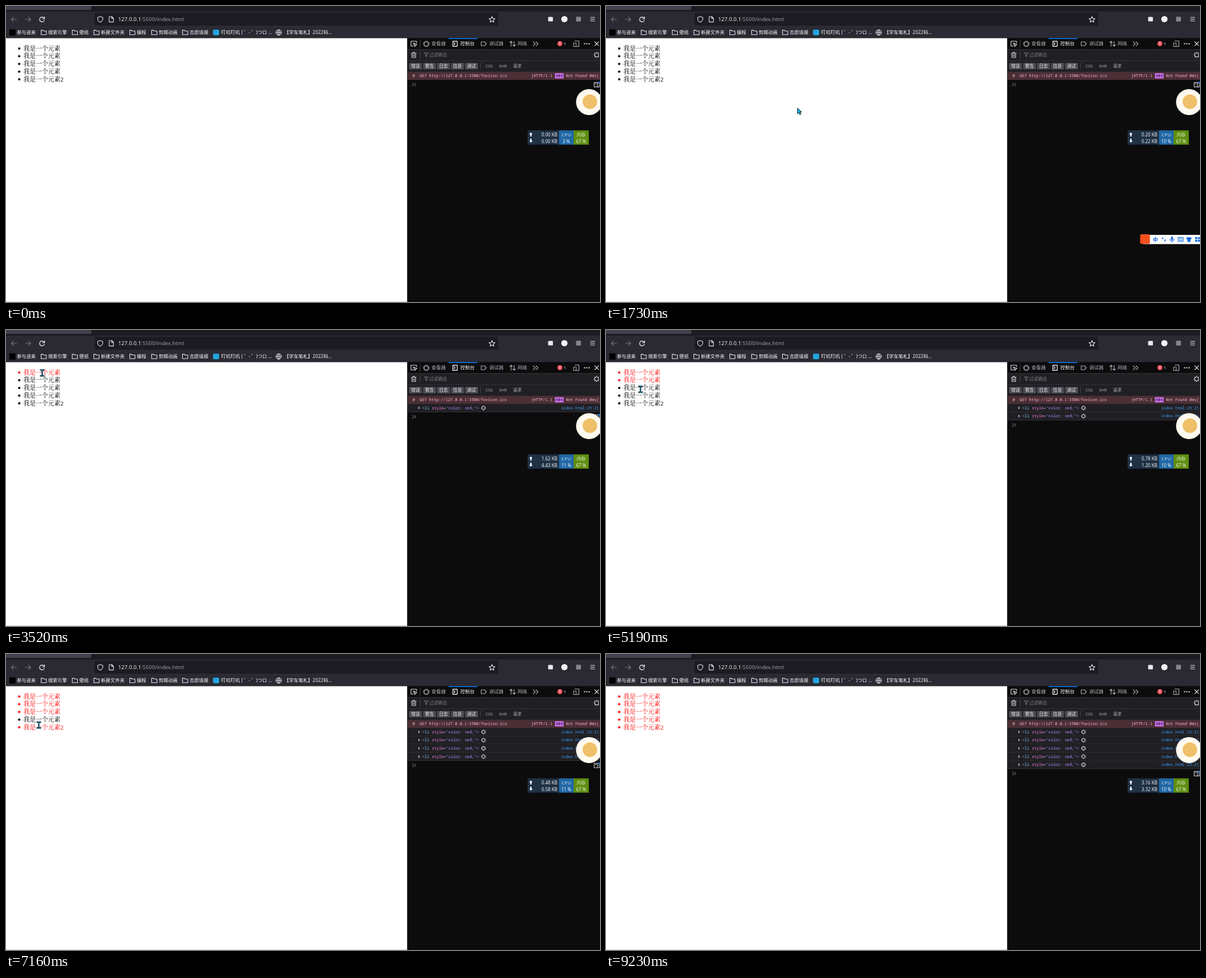
Animation, 1059 px wide and 529 px high, one loop 9.37 s. Source, as an HTML page:

```html
<!DOCTYPE html>
<html lang="zh-CN">
<head>
<meta charset="utf-8">
<title>List click demo</title>
<style>
html, body { margin: 0; width: 100%; height: 100%; overflow: hidden; background: #0c0c0d; }
svg { display: block; width: 1059px; height: 529px; }
text { white-space: pre; }
.ui { font-family: "Open Sans", "Noto Sans CJK SC", "Noto Sans CJK", sans-serif; }
.mono { font-family: "Noto Sans Mono", "Liberation Mono", monospace; font-size: 7px; }
.page { font-family: "Liberation Serif", "Noto Serif CJK SC", "Noto Sans CJK SC", serif; font-size: 11px; font-weight: 300; }
.line { fill: none; stroke: #e8e8ee; stroke-width: 1.1; stroke-linecap: round; stroke-linejoin: round; }
</style>
</head>
<body>
<svg id="stage" viewBox="0 0 1059 529" xmlns="http://www.w3.org/2000/svg"></svg>
<script>
const LOOP = 9370;
const ROW = 14.65;
const ITEM = 13.75;

const rect = (x, y, w, h, fill, extra = "") =>
  `<rect x="${x}" y="${y}" width="${w}" height="${h}" fill="${fill}" ${extra}/>`;
const circle = (x, y, r, fill) => `<circle cx="${x}" cy="${y}" r="${r}" fill="${fill}"/>`;
const line = (d, extra = "") => `<path class="line" d="${d}" ${extra}/>`;
const text = (x, y, s, size, fill, extra = "") =>
  `<text class="ui" x="${x}" y="${y}" font-size="${size}" fill="${fill}" ${extra}>${s}</text>`;
const mono = (x, y, s, fill, extra = "") =>
  `<text class="mono" x="${x}" y="${y}" fill="${fill}" ${extra}>${s}</text>`;
const group = (id, body, extra = "") => `<g id="${id}" ${extra}>${body}</g>`;
const MID = 'text-anchor="middle"';
const END = 'text-anchor="end"';
const LIGHT = "#fbfbfe";

function browserBar() {
  const folders = [[62, "搜索引擎"], [117.5, "壁纸"], [156, "新建文件夹"],
    [220, "编程"], [259, "剪辑动画"], [314, "志愿填报"]];
  const folder = ([x, name]) =>
    line(`M${x + .6} 51V43.4H${x + 4}L${x + 5.2} 44.8H${x + 10}V51.3H${x + .6}Z`) +
    text(x + 13.2, 50.3, name, 8.45, LIGHT);
  return rect(0, 0, 1059, 10, "#1c1b22") +
    rect(-4, -6, 156, 13, "#42414d", 'rx="2"') +
    rect(0, 10, 1059, 47.5, "#2b2a33") +
    rect(158, 12, 719.5, 23, "#1c1b22", 'rx="3"') +
    line("M19 24H9.5M13.5 20L9.5 24L13.5 28", 'stroke="#77767e" style="stroke:#77767e"') +
    line("M34.5 24H44M40 20L44 24L40 28", 'style="stroke:#77767e"') +
    line("M68 22A4.3 4.3 0 1 0 68.3 25.4M68.6 19.4V22.6H65.4", 'style="stroke-width:1.3"') +
    line("M168 18.8L172.5 20.4V23.5Q172 27 168 29Q164 27 163.5 23.5V20.4Z") +
    line("M184 19H188.6L191.6 22V28.6H184ZM188.4 19.2V22.2H191.4") +
    text(200, 27, `<tspan fill="${LIGHT}">127.0.0.1</tspan>:5500/index.html`, 9.7, "#a3a3ab") +
    line("M866.5 18.8L868 22.2L871.8 22.6L869 25.1L869.8 28.8L866.5 26.9L863.2 28.8L864 25.1L861.2 22.6L865 22.2Z") +
    rect(966.5, 19.5, 8.6, 8, "#e8e8ee", 'rx="1.5"') +
    circle(995.5, 23.5, 5.6, "#f4f4f6") +
    rect(1016.5, 19.3, 8.4, 8.4, "#87868e") +
    line("M1042 20.3H1049.5M1042 23.5H1049.5M1042 26.7H1049.5") +
    rect(6, 41.8, 11, 11, "#000") +
    text(19.3, 50.3, "参与进来", 8.45, LIGHT) +
    folders.map(folder).join("") +
    rect(369, 42.2, 11, 10, "#20a4de", 'rx="2"') +
    text(383.5, 50.3, "叮叽叮叽 ( ゜- ゜)つロ ...", 8.45, LIGHT) +
    line("M481.2 47.3H491.2M486.2 42.4V52.2M486.2 42.4A4.9 4.9 0 1 0 486.2 52.2A4.9 4.9 0 1 0 486.2 42.4A2.3 4.9 0 0 0 486.2 52.2A2.3 4.9 0 0 0 486.2 42.4", 'style="stroke-width:.9"') +
    text(496, 50.3, "【学车笔札】2022科...", 8.45, LIGHT);
}

function page() {
  let out = rect(0, 57.5, 715, 471.5, "#fff") + rect(0, 527.7, 715, 1.3, "#d9d9dc");
  for (let i = 0; i < 5; i++) {
    const y = 75.6 + i * ITEM;
    out += group("item" + i, circle(23.6, y + .4, 2.1, "inherit").replace('fill="inherit"', "") +
      `<text class="page" x="31" y="${y + 3.9}">我是一个元素${i === 4 ? "2" : ""}</text>`);
  }
  return out;
}

function devtools() {
  const tab = (x, s, fill = "#b1b1b8") => text(x, 70.4, s, 8.5, fill);
  const grey = 'style="stroke:#b1b1b8"';
  const filters = ["错误", "警告", "日志", "信息", "调试"].map((s, i) =>
    rect(718.5 + i * 25, 101.7, 23, 11.6, "#4c4c55", 'rx="1.2"') +
    text(730 + i * 25, 110.3, s, 7.7, "#f0f0f4", MID)).join("");
  return rect(715, 57.5, 1.2, 471.5, "#38383d") +
    rect(716, 57.5, 343, 471.5, "#0c0c0d") +
    rect(716, 77, 343, 40.5, "#202024") +
    rect(716, 77, 343, .8, "#38383d") + rect(716, 97.4, 343, .8, "#38383d") +
    line("M726 71.5H722V63H732V66M726.5 66.2L732.5 69L730 70L729 72.6Z") +
    line("M738.3 61V74", 'style="stroke:#44444a"') +
    line("M745.8 64.2H752.8V71.2H745.8ZM748 62.5V64M750.6 62.5V64M748 71.3V73M750.6 71.3V73M744 66.4H745.6M744 69H745.6M753 66.4H754.6M753 69H754.6", grey) +
    tab(758.5, "查看器") +
    rect(789, 57.5, 51.5, 1.5, "#0a84ff") +
    line("M796.5 63H804.5V72H796.5ZM798.5 65.5L800.6 67.5L798.5 69.5", 'style="stroke-width:1.3"') +
    tab(810, "控制台", LIGHT) +
    line("M847.2 64H853L856.5 67.5L853 71H847.2Z", grey) + tab(861.5, "调试器") +
    line("M900.5 72V63M898 65.6L900.5 63L903 65.6M906 63V72M903.5 69.4L906 72L908.5 69.4", grey) +
    tab(912, "网络") +
    line("M940 64L943.6 67.5L940 71M945 64L948.6 67.5L945 71", grey) +
    circle(987.5, 67.3, 4.5, "#ff4f5e") + rect(986.9, 64.6, 1.2, 3.4, "#fff") + rect(986.9, 68.8, 1.2, 1.2, "#fff") +
    text(994, 70.4, "1", 8, "#d0d0d6") +
    line("M1014.5 62.5H1021.5V72.5H1014.5M1012 66H1016.4V72.5H1012Z", grey) +
    [1031.5, 1035.6, 1039.7].map(x => circle(x, 67.5, 1.2, "#d0d0d6")).join("") +
    line("M1049.8 64L1056.6 70.8M1056.6 64L1049.8 70.8") +
    line("M722.6 84.5H731.4M725.5 84.3V82.8H728.5V84.3M723.6 84.6V92H730.4V84.6M725.8 86.5V90M728.2 86.5V90", 'style="stroke:#d0d0d6"') +
    line("M738.3 81V94", 'style="stroke:#44444a"') +
    line("M746 84H752.6L750 87.2V91L748.6 90V87.2Z", 'style="stroke:#88888f;stroke-width:.9"') +
    text(754.5, 90.4, "过滤输出", 7.9, "#7c7c84") +
    line("M1053 84A3.4 3.4 0 1 0 1053 90.8A3.4 3.4 0 1 0 1053 84M1053 82.4V84M1053 90.8V92.4M1048 87.4H1049.6M1049.4 83.8L1050.6 85M1049.4 91L1050.6 89.8M1056.6 83.8L1055.4 85M1056.6 91L1055.4 89.8", 'style="stroke:#d0d0d6"') +
    filters + line("M846.3 102V113", 'style="stroke:#44444a"') +
    text(861.5, 110.2, "CSS", 7.4, "#b1b1b8", MID) + text(886, 110.2, "XHR", 7.4, "#b1b1b8", MID) +
    text(911.5, 110.2, "请求", 7.7, "#b1b1b8", MID) +
    rect(716, 117.4, 343, 14.6, "#4b2f36") +
    `<path d="M725.5 121.2V128L729.6 124.6Z" fill="#b08a94"/>` +
    mono(737.5, 127.1, "GET http://127.0.0.1:5500/favicon.ico", "#ffb3d2") +
    mono(936.3, 127.1, "[HTTP/1.1", "#ffb3d2") +
    rect(978.7, 120, 15.4, 9.4, "#c770f0", 'rx="1.2"') + mono(986.4, 127.1, "404", "#22101f", MID) +
    mono(1057, 127.1, "Not Found 0ms]", "#ffb3d2", END);
}

function logRow(i) {
  const y = 132 + i * ROW;
  const t = (s, c) => `<tspan fill="${c}">${s}</tspan>`;
  return group("row" + i,
    rect(716, y, 343, ROW, "#202024") + rect(716, y + ROW - .7, 343, .8, "#38383d") +
    `<path d="M735 ${y + 4.2}V${y + 10.2}L738.8 ${y + 7.2}Z" fill="#8a8a92"/>` +
    mono(742.3, y + 9.6, t("&lt;li ", "#75bfff") + t("style", "#ff7de9") + t("=", "#b1b1b8") +
      t('"color: red;"', "#b98eff") + t("&gt;", "#75bfff"), LIGHT) +
    line(`M848.8 ${y + 4.8}H853.8V${y + 9.8}H848.8ZM851.3 ${y + 3.2}V${y + 4.8}M851.3 ${y + 9.8}V${y + 11.4}M847.2 ${y + 7.3}H848.8M853.8 ${y + 7.3}H855.4`, 'style="stroke:#c8c8ce"') +
    mono(1057, y + 9.6, "index.html:25:21", "#3f9cf5", END));
}

const prompt = () => group("prompt",
  line("M724.3 137.6L727.1 140.4L724.3 143.2M728 137.6L730.8 140.4L728 143.2", 'style="stroke:#9a9aa2;stroke-width:.9"') +
  line("M1048.5 136.6H1058V144.6H1048.5ZM1054.6 136.6V144.6M1050.2 139H1052.6", 'style="stroke:#c8c8ce"') +
  circle(1057.6, 136.6, 1.4, "#0a84ff"));

function monitor() {
  const label = (id, x, y, extra, s = "") => text(x, y, s, 8.1, "#fff", `id="${id}" ${extra}`);
  return rect(930, 222.3, 56.3, 25.5, "#1f3145") + rect(986, 222.3, 26.3, 25.5, "#2168a6") +
    rect(1012, 222.3, 27, 25.5, "#5f8f10") +
    `<path d="M935.8 226L938.9 229.5H936.9V233.2H934.7V229.5H932.7ZM935.8 244.2L938.9 240.7H936.9V237H934.7V240.7H932.7Z" fill="#fff"/>` +
    label("up", 983, 233, END) + label("down", 983, 244.8, END) + label("cpu", 999, 244.8, MID) +
    text(999.4, 233.4, "CPU", 7.6, "#e6eef6", MID + ' letter-spacing="1"') +
    text(1025.5, 233.2, "内存", 7.8, "#eef4e2", MID) + text(1025.5, 244.8, "67 %", 8.1, "#fff", MID);
}

function inputBar() {
  const blue = 'style="stroke:#1769e0;stroke-width:1.2"';
  const fill = d => `<path d="${d}" fill="#1769e0"/>`;
  return group("input",
    rect(956, 409, 110, 16.4, "#fff", 'rx="2"') +
    rect(952.3, 408, 17.4, 17, "#f4511e", 'rx="2"') +
    text(979.5, 420.8, "中", 9.4, "#1769e0", MID + ' font-weight="700"') +
    `<circle cx="992.5" cy="415" r="1.2" fill="none" stroke="#1769e0"/>` +
    fill("M995.6 417.4H998.2V419L996.4 421.3H995.6L996.2 419.4H995.6Z") +
    rect(1007.4, 412, 3.6, 6.6, "#1769e0", 'rx="1.8"') +
    line("M1005.6 416.5Q1005.8 420 1009.2 420Q1012.6 420 1012.8 416.5M1009.2 420V422.2", blue) +
    line("M1020 413.6H1029V421H1020ZM1022 416H1027M1022.4 418.8H1026.6", blue) +
    fill("M1037 412.8Q1039.3 414.6 1041.6 412.8L1044.2 415L1042.8 417.2L1041.9 416.8V421.8H1036.7V416.8L1035.8 417.2L1034.4 415Z") +
    [[1050.2, 413], [1055, 413], [1050.2, 417.8], [1055, 417.8]].map(([x, y]) =>
      rect(x, y, 3.8, 3.8, "#1769e0", 'rx="1"')).join(""));
}

const cursors = () => group("arrow",
  `<path d="M.5 .5V10.4L2.8 8.4L4.5 12.2L6.4 11.4L4.8 7.7H8Z" fill="#0bb4ee" stroke="#101820" stroke-width="1" stroke-linejoin="round"/>`) +
  group("beam",
    `<path d="M-4 -5.3H4M0 -5.3V5.3M-4 5.3H4" fill="none" stroke="#0d2431" stroke-width="2.4"/>
     <path d="M-3.4 -5.3H3.4M0 -5.3V5.3M-3.4 5.3H3.4" fill="none" stroke="#1c7697" stroke-width=".9"/>`);

const stage = document.getElementById("stage");
stage.innerHTML = browserBar() + page() + devtools() + [0, 1, 2, 3, 4].map(logRow).join("") +
  prompt() + circle(1039.5, 171.7, 23.2, "#fffaf0") + circle(1041, 171, 13, "#efc069") +
  monitor() + inputBar() + cursors();
const $ = id => document.getElementById(id);

// time, then pointer hot spot
const path = [
  [50, 570, 522], [430, 422, 361], [970, 422, 361], [1420, 344, 182], [1700, 344, 182],
  [1730, 341, 182], [2510, 70, 80], [2670, 67.5, 79.5], [3310, 64.5, 76.7], [3520, 64.5, 76.7],
  [3850, 67, 89.5], [4490, 67, 89.5], [4890, 66, 102.5], [5060, 66, 102.5], [5190, 61.5, 106],
  [5390, 61.5, 104.5], [5910, 61.5, 104.5], [6610, 60, 130], [6880, 60, 130],
  [7160, 58.5, 127], [7420, 74, 117], [8250, 74, 117], [8580, 615, 502]];

// time, item index
const clicks = [[2670, 0], [4490, 1], [5910, 2], [6880, 4], [7730, 3]];

// time, upload, download, processor load
const loads = [
  [0, "0.00", "0.00", 3], [430, "0.00", "0.00", 7], [1420, "0.20", "0.22", 10],
  [2398, "0.00", "0.00", 6], [3310, "1.62", "4.43", 11], [4350, "0.78", "1.20", 10],
  [5326, "0.20", "0.35", 9], [6302, "0.48", "0.58", 11], [7278, "0.62", "0.74", 10],
  [8254, "0.30", "0.41", 8], [9230, "3.16", "3.32", 10]];

function pointerAt(t) {
  const i = path.findIndex(p => p[0] > t);
  if (i < 1) return null;
  const [t0, x0, y0] = path[i - 1], [t1, x1, y1] = path[i];
  const u = (t - t0) / (t1 - t0), k = u * u * (3 - 2 * u);
  return [x0 + (x1 - x0) * k, y0 + (y1 - y0) * k];
}

function show(id, on) { $(id).style.display = on ? "" : "none"; }
function setText(id, s) { if ($(id).textContent !== s) $(id).textContent = s; }

function draw(t) {
  const done = clicks.filter(c => c[0] <= t);
  for (let i = 0; i < 5; i++) {
    $("item" + i).setAttribute("fill", done.some(c => c[1] === i) ? "#f00" : "#000");
    show("row" + i, i < done.length);
  }
  $("prompt").setAttribute("transform", `translate(0 ${done.length * ROW})`);

  const [, up, down, cpu] = loads.filter(l => l[0] <= t).pop();
  setText("up", up + " KB");
  setText("down", down + " KB");
  setText("cpu", cpu + " %");
  show("input", t >= 50 && t < clicks[0][0]);

  const p = pointerAt(t);
  const overText = p && p[0] < 100 && p[1] < 138;
  show("arrow", p && !overText);
  show("beam", overText);
  if (p) $(overText ? "beam" : "arrow").setAttribute("transform", `translate(${p[0]} ${p[1]})`);
}

const start = performance.now();
function tick() {
  draw((performance.now() - start) % LOOP);
  requestAnimationFrame(tick);
}
tick();
</script>
</body>
</html>
```
